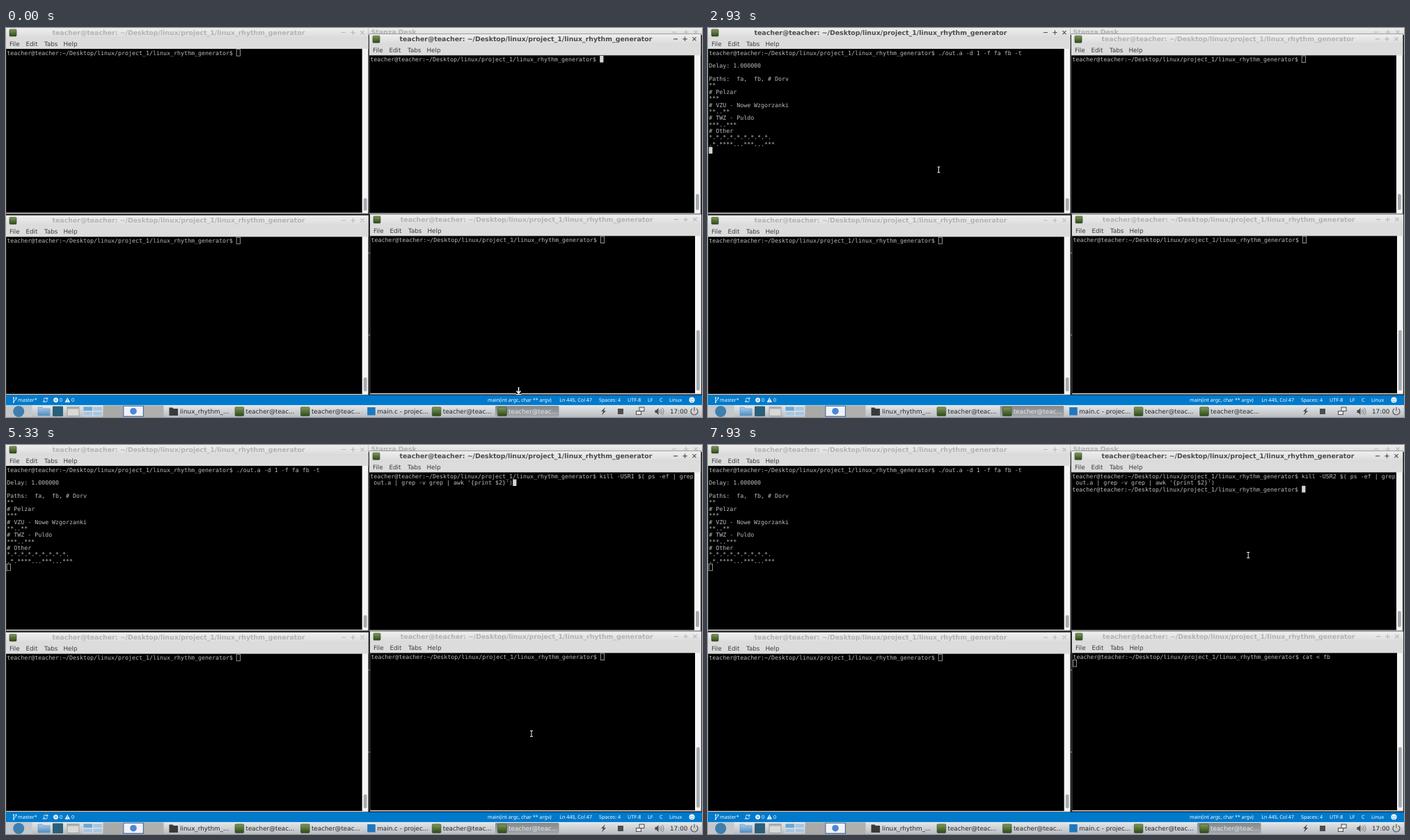
An HTML page that plays this animation: 1000x560 px, repeating every 8 s.

```html
<!DOCTYPE html>
<html lang="en">
<head>
<meta charset="utf-8">
<title>Four terminals</title>
<style>
  html, body { margin: 0; width: 100%; height: 100%; overflow: hidden; background: #1e1e1e; }
  svg { display: block; width: 1000px; height: 560px; }
  text { white-space: pre; text-rendering: geometricPrecision; }
  .mono { font: 8.306px "DejaVu Sans Mono", monospace; fill: #bcbcbc; }
  .title { font: bold 9.38px "DejaVu Sans", sans-serif; fill: #b3b3b3; }
  .menu { font: 8.75px "DejaVu Sans", sans-serif; fill: #3a3a3a; }
  .task { font: 8.8px "DejaVu Sans", sans-serif; fill: #262626; }
  .status { font: 7.15px "Noto Sans", sans-serif; fill: #fff; }
  .ctl { stroke: #b8b8b8; stroke-width: 1.2; fill: none; }
  .on .title { fill: #4a4a4a; }
  .on .ctl { stroke: #555; }
  .cur { fill: none; stroke: #b4b4b4; stroke-width: .8; }
  .on .cur { fill: #d4d4d4; stroke: none; }
  .pill { fill: none; }
  .on .pill { fill: url(#pressed); }
  .on .task { fill: #e8e8e8; }
</style>
</head>
<body>
<script>
const NS = 'http://www.w3.org/2000/svg';
function el(parent, tag, attrs = {}, content) {
  const e = document.createElementNS(NS, tag);
  for (const k in attrs) e.setAttribute(k, attrs[k]);
  if (content !== undefined) e.textContent = content;
  parent.appendChild(e);
  return e;
}
const rect = (p, x, y, width, height, fill, more) => el(p, 'rect', { x, y, width, height, fill, ...more });
const circle = (p, cx, cy, r, fill, more) => el(p, 'circle', { cx, cy, r, fill, ...more });
const text = (p, cls, x, y, s) => el(p, 'text', { class: cls, x, y }, s);
const line = (p, d, stroke, w = 1, more) => el(p, 'path', { d, stroke, fill: 'none', 'stroke-width': w, ...more });

const svg = el(document.body, 'svg', { viewBox: '0 0 1000 560' });
const defs = el(svg, 'defs');
function gradient(id, ...stops) {
  const g = el(defs, 'linearGradient', { id, x1: 0, y1: 0, x2: 0, y2: 1 });
  stops.forEach((c, i) => el(g, 'stop', { offset: i / (stops.length - 1), 'stop-color': c }));
}
gradient('bar', '#efefef', '#dadada');
gradient('panel', '#e4e6e8', '#cfd2d5', '#b9bdc1');
gradient('pressed', '#85898d', '#a3a7ab');
gradient('green', '#7f9a55', '#2c4a1c');
gradient('blue', '#a9cdea', '#4f8dc0');

const USER = 'teacher';
const DIR = '~/Desktop/linux/project_1/linux_rhythm_generator';
const PROMPT = `${USER}@${USER}:${DIR}$ `;
const COL = 5, ROW = 9.375;

function appIcon(p, x, y, s) {
  rect(p, x, y, s, s, 'url(#green)', { rx: 1.2, stroke: '#33402a', 'stroke-width': .6 });
}

function controls(p, xs, y) {
  const [a, b, c] = xs;
  el(p, 'path', { class: 'ctl', d:
    `M${a - 3} ${y}h6M${b - 3.2} ${y}h6.4M${b} ${y - 3.2}v6.4` +
    `M${c - 2.6} ${y - 2.6}l5.2 5.2M${c + 2.6} ${y - 2.6}l-5.2 5.2` });
}

// y is the middle of the title row; top and bottom bound the black area
function makeTerm({ x, y, w, top, bottom, right, edge, thumb, titleX, lineX }) {
  const g = el(svg, 'g');
  rect(g, x, y - 7.4, w, bottom - y + 8.9, '#d8d8d8', { stroke: '#5a5a5a', 'stroke-width': .6 });
  rect(g, x, y - 7, w, 15, 'url(#bar)');
  rect(g, x, y + 8, w, top - y - 8, '#dcdcdc');
  appIcon(g, x + 5, y - 4.6, 10);
  text(g, 'title', titleX, y + 3.3, `${USER}@${USER}: ${DIR}`);
  controls(g, [right - 27, right - 13.5, right], y);
  [['File', 5], ['Edit', 28.5], ['Tabs', 55], ['Help', 82.5]]
    .forEach(([s, dx]) => text(g, 'menu', x + dx, y + 19, s));
  rect(g, x + .2, top, edge - x - .2, bottom - top, '#000');
  rect(g, edge, top, 8.3, bottom - top, '#f5f5f5');
  rect(g, edge + 2, thumb[0], 4.8, thumb[1] - thumb[0], '#a7abb1', { rx: 2 });
  const rowTop = top + .8, rows = [];
  const cur = el(g, 'rect', { class: 'cur', width: 5.2, height: 9.6 });
  let shown = null;
  return (lines, on) => {
    g.setAttribute('class', on ? 'on' : '');
    const key = lines.join('\n');
    if (key === shown) return;
    shown = key;
    for (let i = 0; i < Math.max(lines.length, rows.length); i++) {
      rows[i] ||= text(g, 'mono', lineX, rowTop + 7.8 + i * ROW, '');
      rows[i].textContent = lines[i] || '';
    }
    const last = lines.length - 1;
    cur.setAttribute('x', lineX + lines[last].length * COL);
    cur.setAttribute('y', rowTop + last * ROW - .2);
  };
}

// Editor window peeking out behind
rect(svg, 520, 0, 480, 10, 'url(#bar)');
text(svg, 'title', 524.5, 9.4, 'Stanza Desk');
controls(svg, [960, 977, 991], 6);
rect(svg, 521, 323, 2, 2, '#3b6fb5');
rect(svg, 521, 441, 2, 2, '#3b6fb5');

const terms = {
  tl: makeTerm({ x: 0, y: 6.5, w: 520.6, top: 30, bottom: 265.8, right: 512, edge: 511.8, thumb: [245, 263], titleX: 66.5, lineX: 1.2 }),
  bl: makeTerm({ x: 0, y: 277, w: 520.6, top: 300.6, bottom: 526.8, right: 512, edge: 511.8, thumb: [503, 523], titleX: 66.5, lineX: 1.2 }),
  tr: makeTerm({ x: 522, y: 15.8, w: 476.2, top: 39.4, bottom: 266.4, right: 989, edge: 989, thumb: [239, 262], titleX: 565.5, lineX: 523.2 }),
  br: makeTerm({ x: 523, y: 275.6, w: 476, top: 299.4, bottom: 525.8, right: 990, edge: 990, thumb: [435, 522], titleX: 566.8, lineX: 524.4 })
};

// Status bar
rect(svg, 0, 528.6, 1000, 14.4, '#007acc');
line(svg, 'M11 532.5v6M14.5 532.5v1.5q0 2-3.5 2.6', '#fff', .9);
[[11, 532.4], [14.5, 532.4], [11, 538.8]].forEach(([x, y]) => circle(svg, x, y, 1, '#fff'));
line(svg, 'M54 535a3 3 0 0 1 5.3-1.2M59.6 536a3 3 0 0 1-5.3 1.2M59.8 532v2.2h-2.2M53.8 539v-2.2h2.2', '#fff', .9);
circle(svg, 71.6, 535.6, 3.4, '#fff');
line(svg, 'M70.2 534.2l2.8 2.8M73 534.2l-2.8 2.8', '#007acc', .9);
el(svg, 'path', { d: 'M88.3 532l3.7 6.8h-7.4z', fill: '#fff' });
line(svg, 'M88.3 534.3v2.2M88.3 537.2v.8', '#007acc', .9);
[['master*', 17], ['0', 77], ['0', 94], ['main(int argc, char ** argv)', 692], ['Ln 445, Col 47', 795.3],
 ['Spaces: 4', 852], ['UTF-8', 893], ['LF', 922], ['C', 939], ['Linux', 953]]
  .forEach(([s, x]) => text(svg, 'status', x, 538.2, s));
circle(svg, 985.5, 535.6, 4, '#fff');
circle(svg, 984, 534.5, .7, '#007acc');
circle(svg, 987, 534.5, .7, '#007acc');
line(svg, 'M983.2 536.6q2.3 2.6 4.6 0', '#007acc', .8);

// Panel
rect(svg, 0, 543, 1000, 17, 'url(#panel)');
line(svg, 'M0 543.3H1000', '#f4f4f4', .6);
rect(svg, 0, 543.4, 37.5, 16.6, '#c3c8cc');
circle(svg, 18.2, 552, 8, '#3f7fae');
el(svg, 'path', { d: 'M46 546h6l1.5 2h9.5v10h-17z', fill: 'url(#blue)', stroke: '#5d8fb5', 'stroke-width': .6 });
rect(svg, 67, 544.5, 15, 14.5, '#2b5f77', { rx: 1 });
rect(svg, 88, 545.5, 17, 13, '#d9d9d6', { stroke: '#8b8b8b', 'stroke-width': .7 });
rect(svg, 88, 545.5, 17, 3, '#a9adb1');
for (let i = 0; i < 4; i++)
  rect(svg, 111 + i % 2 * 14, 545 + (i >> 1) * 7, 13.2, 6.2, i ? '#a9c6de' : '#6ea6d2', { stroke: '#e8eef3', 'stroke-width': .5 });
rect(svg, 139.5, 543.4, 28.5, 16.6, '#a9a9a7');
rect(svg, 198, 543.4, 28.5, 16.6, '#afafad');
rect(svg, 168.8, 544.2, 28.6, 15, '#f1f3f6', { stroke: '#456b9c', 'stroke-width': 1.2 });
circle(svg, 183, 551.7, 4.8, '#4a87d8');

const short = `${USER}@${USER.slice(0, 4)}...`;
const tasks = {};
[['dir', 'linux_rhythm_...'], ['bl', short], ['tl', short], ['code', 'main.c - projec...'], ['br', short], ['tr', short]]
  .forEach(([id, label], i) => {
    const x = 233.5 + i * 94.4, g = tasks[id] = el(svg, 'g');
    el(g, 'rect', { class: 'pill', x: x - 2.5, y: 544, width: 91.5, height: 15.6, rx: 1.5 });
    if (id === 'dir') el(g, 'path', { d: `M${x + 1} 546.5h5l1.2 1.6h6.3v9.9h-12.5z`, fill: '#3a3a3a' });
    else if (id === 'code') rect(g, x + 2.5, 546, 11.5, 11.5, '#1f78bd');
    else appIcon(g, x + 1.2, 545.8, 12.6);
    text(g, 'task', x + 16.6, 555.2, label);
  });

// Tray
el(svg, 'path', { d: 'M861 546l-6 6h3l-2 5.5 6-6.5h-3z', fill: '#4d4d4d' });
rect(svg, 879, 548, 8, 8, '#4d4d4d');
rect(svg, 910, 546, 7, 5.5, '#e6e6e6', { stroke: '#4d4d4d' });
rect(svg, 905.5, 551.5, 7, 5, '#e6e6e6', { stroke: '#4d4d4d' });
el(svg, 'path', { d: 'M932.5 550h2l3-3v10l-3-3h-2z', fill: '#4d4d4d' });
line(svg, 'M939 549.5q2 2.5 0 5M941 548q3 4 0 8M943 546.8q4 5.2 0 10.4', '#6a6a6a', .8);
text(svg, 'task', 954, 555.2, '17:00');
line(svg, 'M986 548a5 5 0 1 0 6 0M989 545.8v5.5', '#555', 1.2);

// Pointers
const mouse = el(svg, 'g');
const dropArrow = el(mouse, 'g'), beam = el(mouse, 'g');
const arrowPath = 'M0 -5V3M-3 .5L0 3.8L3 .5M-4 5.4H4';
line(dropArrow, arrowPath, '#000', 3);
line(dropArrow, arrowPath, '#fff', 1.5);
line(beam, 'M-2 -4H2M0 -4V4M-2 4H2', '#f2f2f2', 1);

// Timeline, in ticks of 1/15 s
const FOCUS = [[0, 'tr'], [7, 'tl'], [54, 'tr'], [82, 'br'], [107, 'tr']];
const POINTER = [[0, 736.5, 522], [8, 331.5, 204], [48, 331.5, 204], [55, 614.5, 144], [78, 614.5, 144],
  [80, 755, 415.5], [83, 766, 436], [102, 766, 436], [105, 787, 155.5], [107, 776.2, 158.5]];

const cmd = s => [PROMPT + s];
const kill = n => [PROMPT + `kill -USR${n} $( ps -ef | grep`, " out.a | grep -v grep | awk '{print $2}')"];
const RUN = './out.a -d 1 -f fa fb -t';
const OUTPUT = [PROMPT + RUN, '', 'Delay: 1.000000', '', 'Paths:  fa,  fb, # Dorv', '**', '# Pelzar', '***',
  '# VZU - Nowe Wzgorzanki', '**..**', '# TWZ - Puldo', '***..***', '# Other',
  '*.*.*.*.*.*.*.*.*.', '.*.****...***...***', ''];
const SCREENS = {
  tl: [[0, cmd('')], [16, cmd(RUN.slice(0, 5))], [21, cmd(RUN.slice(0, 12))], [22, cmd(RUN.slice(0, 21))],
    [34, cmd(RUN.slice(0, 22))], [36, cmd(RUN.slice(0, 23))], [39, cmd(RUN)], [44, OUTPUT]],
  bl: [[0, cmd('')]],
  tr: [[0, cmd('')], [61, cmd('cle')], [62, cmd('clear')], [64, cmd('')], [68, cmd('clear')], [69, kill(1)],
    [111, kill(2)], [119, [...kill(2), PROMPT]]],
  br: [[0, cmd('')], [87, cmd('ca')], [88, cmd('cat ')], [92, cmd('cat < ')], [93, cmd('cat < fb')], [98, [...cmd('cat < fb'), '']]]
};
const at = (table, k) => table.findLast(row => row[0] <= k)[1];

function pointerAt(k) {
  const i = POINTER.findIndex(p => p[0] > k);
  if (i < 0) return POINTER.at(-1).slice(1);
  const [k0, x0, y0] = POINTER[i - 1], [k1, x1, y1] = POINTER[i];
  const u = (k - k0) / (k1 - k0), e = u * u * (3 - 2 * u);
  return [x0 + (x1 - x0) * e, y0 + (y1 - y0) * e];
}

let tick = -1;
function draw(ms) {
  const k = Math.floor(ms * .015 + .06);
  if (k === tick) return;
  tick = k;
  const focus = at(FOCUS, k);
  for (const id in terms) {
    terms[id](at(SCREENS[id], k), id === focus);
    tasks[id].setAttribute('class', id === focus ? 'on' : '');
  }
  mouse.setAttribute('transform', `translate(${pointerAt(k)})`);
  dropArrow.setAttribute('visibility', k < 1 ? 'visible' : 'hidden');
  beam.setAttribute('visibility', k < 1 ? 'hidden' : 'visible');
}

const start = performance.now();
function loop() {
  draw((performance.now() - start) % 8000);
  requestAnimationFrame(loop);
}
loop();
</script>
</body>
</html>
```
